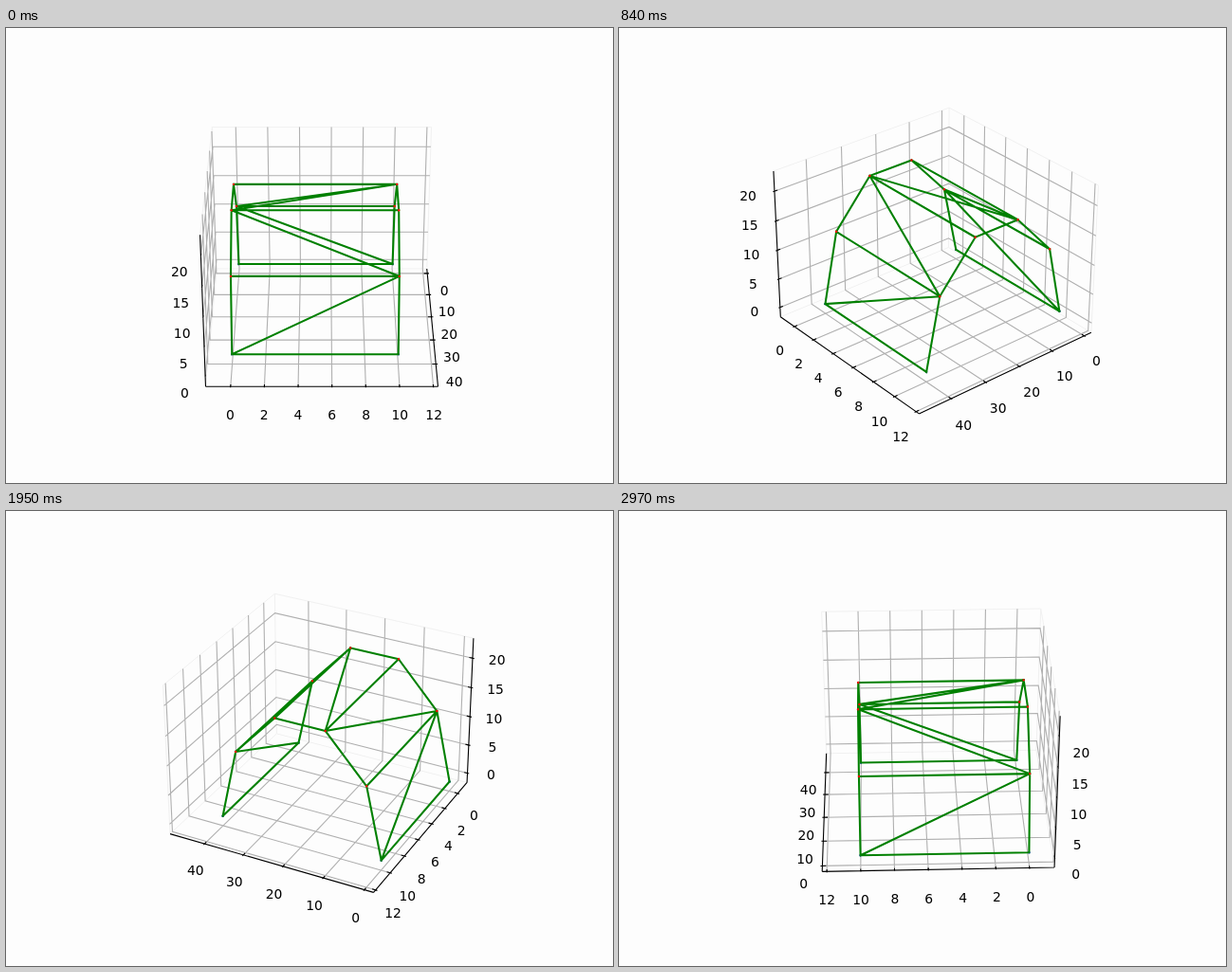
An HTML page that plays this animation: 640 px wide and 480 px high, repeating every 3 s.

```html
<!DOCTYPE html>
<html lang="en">
<head>
<meta charset="utf-8">
<title>Rotating arch truss</title>
<style>
  html, body { margin: 0; width: 100%; height: 100%; overflow: hidden; background: #fdfdfd; }
  svg { display: block; width: 640px; height: 480px; }
  path { fill: none; }
  #panes { stroke: #f1f1f1; stroke-width: 1; }
  #grid { stroke: #b0b0b0; stroke-width: 1.11; }
  #axes { stroke: #000; stroke-width: 1.11; }
  #truss { stroke: #008000; stroke-width: 2.08; stroke-linecap: square; }
  #feet, #joints { stroke-width: 2.4; stroke-linecap: round; }
  #feet { stroke: #00f; }
  #joints { stroke: #f00; }
  text { font: 13.889px "DejaVu Sans", sans-serif; text-anchor: middle; fill: #000; }
</style>
</head>
<body>
<svg viewBox="0 0 640 480">
  <path id="panes"/>
  <path id="grid"/>
  <path id="axes"/>
  <g id="labels"></g>
  <path id="feet"/>
  <path id="truss"/>
  <path id="joints"/>
</svg>
<script>
const FRAME = 30, FRAMES = 100, STEP = 1.8;
const SCALE = 369.6 / 0.185, CX = 143.2 + 0.095 * SCALE, CY = 427.2 - 0.095 * SCALE;
const DIST = 10, RAD = Math.PI / 180;
const sinE = Math.sin(30 * RAD), cosE = Math.cos(30 * RAD);

// Box proportions 4:4:3; axis limits padded by 1/48 on each side.
const CORE = [4, 4, 3].map(v => v * 1.8294640721620434 / Math.sqrt(41));
const HALF = CORE.map(v => v * 25 / 48);
const RADIUS = 20, WIDTH = 10;
const LIMITS = [WIDTH, 2 * RADIUS, RADIUS * Math.sin(72 * RAD)].map(max => {
  const lo = -1.2, hi = 1.2 * max, pad = (hi - lo) / 48;
  return [lo - pad, hi + pad];
});
const TICKS = [[0, 2, 4, 6, 8, 10, 12], [0, 10, 20, 30, 40], [0, 5, 10, 15, 20]];
const LABEL_GAP = 11.5 * 24 / 266.112 / 12;
const BASELINE = 11;

const $ = id => document.getElementById(id);

// Data value to box coordinate; the y axis runs backwards.
function box(axis, value) {
  const [lo, hi] = LIMITS[axis];
  const p = ((value - lo) / (hi - lo) * 2 - 1) * HALF[axis];
  return axis === 1 ? -p : p;
}

const node = (x, k) => [
  box(0, x),
  box(1, RADIUS + RADIUS * Math.cos(36 * k * RAD)),
  box(2, RADIUS * Math.sin(36 * k * RAD))
];
const left = [], right = [], beams = [];
for (let k = 0; k < 6; k++) {
  left.push(node(0, k));
  right.push(node(WIDTH, k));
}
for (let k = 0; k < 6; k++) {
  beams.push([left[k], right[k]]);
  if (k < 5) {
    beams.push([left[k], left[k + 1]], [right[k], right[k + 1]]);
    beams.push(k % 2 ? [right[k], left[k + 1]] : [left[k], right[k + 1]]);
  }
}
const feet = [left[0], right[0], left[5], right[5]];
const joints = [...left.slice(1, 5), ...right.slice(1, 5)];

const labels = TICKS.map(list => list.map(value => {
  const text = document.createElementNS("http://www.w3.org/2000/svg", "text");
  text.textContent = value;
  return $("labels").appendChild(text);
}));

function camera(azim) {
  const c = Math.cos(azim), s = Math.sin(azim);
  return ([x, y, z]) => {
    const across = y * c - x * s, toward = x * c + y * s;
    const k = SCALE / (DIST - toward * cosE - z * sinE);
    return [CX + across * k, CY - (z * cosE - toward * sinE) * k];
  };
}

function draw(frame) {
  const azim = (-90 + frame * STEP) * RAD;
  const project = camera(azim);
  const side = frame < FRAMES / 2 ? -1 : 1;
  const [hx, hy, hz] = HALF;
  const near = side * hy, far = -near;

  const line = (...pts) => "M" + pts.map(p => project(p).map(v => v.toFixed(2)).join(" ")).join("L");
  const dot = p => line(p, p);

  // Corner position of each axis line; its own coordinate is filled in per tick.
  const origin = [[0, near, -hz], [hx, 0, -hz], [-hx, near, 0]];
  const tickDir = [1, 0, 1];
  const at = (axis, v) => origin[axis].map((p, i) => i === axis ? v : p);

  let grid = "", axes = "";
  TICKS.forEach((list, axis) => {
    axes += line(at(axis, -HALF[axis]), at(axis, HALF[axis]));
    list.forEach((value, i) => {
      const v = box(axis, value), pos = at(axis, v), d = tickDir[axis];
      grid += [
        () => line(pos, [v, far, -hz], [v, far, hz]),
        () => line(pos, [-hx, v, -hz], [-hx, v, hz]),
        () => line(pos, [-hx, far, v], [hx, far, v])
      ][axis]();

      const shift = amount => pos.map((p, j) => j === d ? p + Math.sign(p) * amount * CORE[j] / 12 : p);
      axes += line(shift(-0.2), shift(0.1));

      const [x, y] = project(pos.map((p, j) => j === axis ? p : p + Math.sign(p) * LABEL_GAP * CORE[j]));
      labels[axis][i].setAttribute("x", x.toFixed(2));
      labels[axis][i].setAttribute("y", Math.round(y + BASELINE));
    });
  });

  $("panes").setAttribute("d",
    line([-hx, near, -hz], [-hx, near, hz], [-hx, far, hz], [hx, far, hz], [hx, far, -hz]) +
    line([-hx, near, -hz], [-hx, far, -hz], [hx, far, -hz]) +
    line([-hx, far, -hz], [-hx, far, hz]));
  $("grid").setAttribute("d", grid);
  $("axes").setAttribute("d", axes);
  $("feet").setAttribute("d", feet.map(dot).join(""));
  $("truss").setAttribute("d", beams.map(b => line(...b)).join(""));
  $("joints").setAttribute("d", joints.map(dot).join(""));
}

const start = performance.now();
let shown = -1;
function tick() {
  const frame = Math.floor((performance.now() - start) / FRAME) % FRAMES;
  if (frame !== shown) draw(shown = frame);
  requestAnimationFrame(tick);
}
tick();
</script>
</body>
</html>
```
